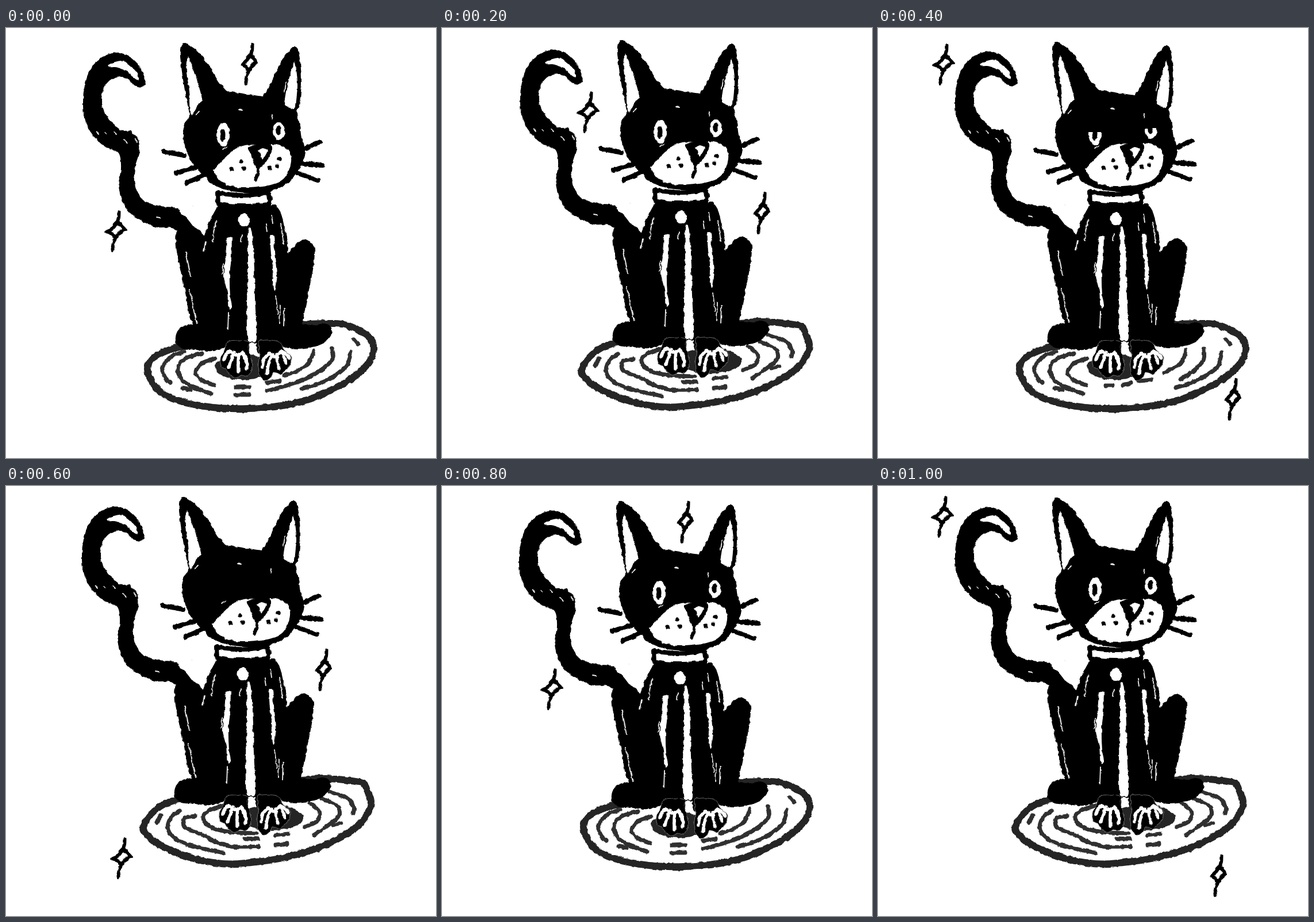
Write an HTML page that moves like this. It is 748 px wide and 748 px high and loops after 1.2 s.

```html
<!DOCTYPE html>
<html lang="en">
<head>
<meta charset="utf-8">
<title>Cat on a puddle</title>
<style>
  html, body { margin: 0; width: 100%; height: 100%; overflow: hidden; background: #fff; }
  svg { display: block; width: 100%; height: 100%; }
</style>
</head>
<body>
<svg id="stage" viewBox="0 0 748 748">
  <defs>
    <filter id="ink" filterUnits="userSpaceOnUse" x="-20" y="-20" width="800" height="800" color-interpolation-filters="sRGB">
      <feTurbulence type="fractalNoise" baseFrequency="0.11" numOctaves="2" seed="4" result="noise"/>
      <feDisplacementMap in="SourceGraphic" in2="noise" scale="5" xChannelSelector="R" yChannelSelector="G"/>
    </filter>
  </defs>
</svg>
<script>
const LOOP = 1200, STEP = 200;
const INK = "#000", WASH = "#252525", PAPER = "#fff";
const stage = document.getElementById("stage");

function add(parent, tag, attrs = {}) {
  const el = document.createElementNS("http://www.w3.org/2000/svg", tag);
  for (const key in attrs) el.setAttribute(key, attrs[key]);
  return parent.appendChild(el);
}

// Smooth curve through "x,y" points; a trailing * marks a sharp corner.
function curve(text, closed) {
  const pts = text.trim().split(/\s+/).map(s => {
    const [x, y] = s.split(",").map(parseFloat);
    return { x, y, sharp: s.endsWith("*") };
  });
  const n = pts.length;
  const at = i => closed ? pts[(i + n) % n] : pts[Math.max(0, Math.min(n - 1, i))];
  const slope = i => {
    if (at(i).sharp) return [0, 0];
    const a = at(i - 1), b = at(i + 1);
    return [(b.x - a.x) / 6, (b.y - a.y) / 6];
  };
  let d = `M${pts[0].x} ${pts[0].y}`;
  for (let i = 0; i < (closed ? n : n - 1); i++) {
    const p = at(i), q = at(i + 1), [ax, ay] = slope(i), [bx, by] = slope(i + 1);
    d += `C${p.x + ax} ${p.y + ay} ${q.x - bx} ${q.y - by} ${q.x} ${q.y}`;
  }
  return d + (closed ? "Z" : "");
}

const group = parent => add(parent, "g", { filter: "url(#ink)" });
const blob = (parent, pts, fill = INK, more = {}) =>
  add(parent, "path", { d: curve(pts, true), fill, ...more });
const line = (parent, pts, width, stroke = INK) =>
  add(parent, "path", {
    d: curve(pts, false), fill: "none", stroke,
    "stroke-width": width, "stroke-linecap": "round", "stroke-linejoin": "round"
  });
const lines = (parent, list, width, stroke) =>
  list.split("|").forEach(pts => line(parent, pts, width, stroke));
const oval = (parent, cx, cy, rx, ry, fill) => add(parent, "ellipse", { cx, cy, rx, ry, fill });

function puddle(rim, center, ripples) {
  const g = group(stage);
  blob(g, rim, PAPER, { stroke: WASH, "stroke-width": 12 });
  oval(g, ...center, WASH);
  lines(g, ripples, 7, "#303030");
  return g;
}

const rimA = `247,600 250,580 266,568 298,556 400,535 480,519 570,514 605,522 632,538 639,553
  635,575 612,602 575,625 530,645 480,657 420,662 360,660 300,648 265,630`;
const leftA = `310,563 285,573 272,592 277,608 286,617|
  341,566 312,575 299,592 306,612 328,626 357,636|
  364,575 341,583 330,600 343,614 362,621|605,541 612,550|307,627 321,629|`;
const wideA = puddle(rimA, [412, 590, 48, 22], leftA +
  `400,625 423,624|400,638 423,638|535,562 527,582 506,597 484,604|
  567,557 568,576 545,597 510,615 455,631|600,562 592,588 560,612 514,628|455,617 476,614`);
const calmA = puddle(rimA, [412, 590, 48, 22], leftA +
  `396,622 408,622|425,621 440,618|455,614 475,612|535,560 528,582 497,600|
  567,558 566,578 548,597 526,611|598,563 590,590 557,612 518,626`);
const puddleB = puddle(
  `244,592 262,567 300,548 400,530 480,517 560,511 625,518* 639,550 628,580 600,605
  550,630 490,648 430,657 380,659 320,647 270,625 246,605`,
  [465, 579, 56, 22],
  `273,575 267,587|306,567 290,580 286,600 302,618 335,630 382,640|
  334,576 314,580 316,596 344,608 372,622 402,630 443,629|
  385,557 356,567 347,580 362,596 395,604 440,606|
  418,615 443,616|472,610 495,607|473,626 494,624|
  532,553 549,568 545,585 524,595|552,545 578,557 584,574 566,591 540,609|
  567,534 597,545 609,560 608,572|573,592 587,588`);

const cat = group(stage);

// Tail
blob(cat, `243,97 238,78 228,62 210,47 190,43 165,52 147,72 137,100 134,130 137,160 150,185
  170,205 190,213 198,222 200,245 196,270 200,295 212,318 235,335 260,346 285,347 300,352
  330,356 318,335 305,322 296,313 270,310 245,303 230,288 223,265 225,240 232,215 230,195
  218,180 200,178 185,165 170,145 166,125 170,105 182,90 200,85 213,89 223,99 236,103`);
blob(cat, "180,63 200,57 213,64 227,78 231,90 222,87 213,77 203,71 190,68 181,68", PAPER);

// Body
blob(cat, `368,310* 355,335 345,361* 333,349 318,343 298,352 296,380 303,420 312,460 318,495
  325,515* 310,518 298,528 295,545 305,556 330,560 360,562 380,556 386,546* 386,565 420,565
  422,548* 436,548* 440,565 474,562 476,552 492,558 520,558 548,550 564,537 566,522 555,514
  535,517 515,515* 524,470 534,420 537,385 531,373 520,368 508,373 495,388 489,391*
  490,375 484,345 478,322 468,308*`);
blob(cat, "421,353 427,353 430,380 432,420 433,470 436,538 428,546 420,538 419,480 421,420", PAPER);
blob(cat, "384,365* 393,363* 392,400 389,430 390,465 393,486 387,487 385,460 379,432 382,400", PAPER);
blob(cat, "460,362 466,363 467,390 471,430 468,458 464,440 464,415 461,392", PAPER);
lines(cat, `313,390 321,432|319,455 325,486|326,488 332,514|387,494 386,524|469,465 473,498|
  477,482 476,514|484,488 483,518|478,340 483,376|462,326 464,340|452,342 454,354|
  347,372 344,388|366,334 360,360|361,362 360,372|378,410 377,428|410,360 409,372`, 1.8, "#eee");

// Collar and bell
blob(cat, "368,287* 385,289 415,291 457,287* 459,298 457,307* 420,310 385,309 369,306*",
  PAPER, { stroke: INK, "stroke-width": 8, "stroke-linejoin": "round" });
oval(cat, 414, 334, 10.5, 11, PAPER);

// Whiskers
lines(cat, `275,215 310,222|296,252 337,240|315,269 347,255|
  512,213 547,197|508,235 550,239|500,250 543,265`, 8);

// Head
blob(cat, `308,26* 319,30 336,43 355,68 371,94 384,110* 400,112 425,116 447,119* 459,100
  472,72 486,46 500,32* 507,36 512,60 514,95 511,130 506,148 512,170 515,192 521,211 518,228
  508,248 495,266 476,278 455,285 430,287 400,285 375,279 355,268 340,252 325,236 313,212
  308,185 312,165 319,152 314,125 308,90 304,60 303,38`);
blob(cat, "317,49* 325,70 335,100 342,125* 332,137 324,153* 321,146 319,110 314,75", PAPER);
blob(cat, "502,57* 492,90 486,124 485,135* 500,140 504,136* 507,100 505,72", PAPER);
blob(cat, `361,248* 375,232 395,213 412,205 428,203 448,202 470,203 488,210 496,226 493,245
  485,260 470,270 445,276 415,278 390,275 372,265`, PAPER);
blob(cat, "421,208 432,203 447,200 460,203 463,211 457,224 447,239 439,246 432,236 426,220");
blob(cat, "439,213* 447,209 456,212* 451,222 446,229*", PAPER);
line(cat, "439,243 438,253 434,265", 5);
for (const [x, y] of [[409, 232], [392, 245], [414, 244], [475, 228], [459, 243], [472, 240]])
  oval(cat, x, y, 3.8, 3.6, INK);
lines(cat, `487,95 485,110|331,150 336,145|404,142 411,143|376,212 384,207|462,158 463,152|
  172,182 174,184|188,181 193,186|207,194 211,201|225,192 228,199|158,180 161,185|
  325,310 326,311|262,329 268,330`, 1.8, "#eee");

// Eyes
const eyes = add(cat, "g");
oval(eyes, 378, 185.5, 11, 20.5, PAPER);
oval(eyes, 377, 186, 4.6, 11, INK);
oval(eyes, 474.5, 179, 10.5, 15, PAPER);
oval(eyes, 474, 179, 4.6, 8.5, INK);
const lids = add(eyes, "g");
add(lids, "rect", { x: 362, y: 160, width: 32, height: 23 });
add(lids, "rect", { x: 460, y: 160, width: 30, height: 17 });

// Paws
const paws = group(stage);
const halo = { stroke: "#888", "stroke-width": 0.8 };
blob(paws, `387,545 380,560 373,576 375,590 384,595 391,604 402,609 410,604 420,606 427,596
  427,578 421,560 420,545`, INK, halo);
blob(paws, `441,545 441,565 439,585 440,602 451,613 460,608 466,599 478,602 486,595 496,584
  495,570 484,560 473,545`, INK, halo);
lines(paws, `390,562 383,568 379,577|397,564 391,578 388,590|405,567 404,580 404,597|
  412,565 418,577 419,593|392,563 400,569 413,565`, 5.5, PAPER);
lines(paws, `458,566 449,576 446,590|464,568 457,584 454,601|471,567 472,580 475,593|
  478,564 485,574 486,584|481,563 490,569 492,574|457,566 468,571 480,563`, 5.5, PAPER);

// Sparkles: a pointed diamond around its own centre
function sparkle(w, tall) {
  const g = group(add(stage, "g"));
  g.setAttribute("transform", "translate(-300 -300)");
  const p = (x, y, c = "") => `${300 + x},${300 + y}${c}`;
  blob(g, [p(2, -15), p(w - 4, -2, "*"), p(3, 6), p(-2, 16, "*"), p(-4, 7), p(-w + 4, 1, "*"), p(-4, -5)].join(" "),
    PAPER, { stroke: INK, "stroke-width": 6, "stroke-linejoin": "round" });
  line(g, `${p(2, -13)} ${p(5, -24)} ${p(5.5, -tall)}`, 6);
  line(g, `${p(-2, 14)} ${p(-5, 25)} ${p(-5.5, tall)}`, 6);
  return g.parentNode;
}
const slim = sparkle(16, 34), broad = sparkle(20, 33);

const move = (el, [x, y]) => el.setAttribute("transform", `translate(${x} ${y})`);
const show = (el, on) => el.setAttribute("display", on ? "inline" : "none");

const first = { cat: [0, 0], paws: [0, 0], water: wideA, pool: [0, 0], eye: "open", slim: [423, 62], broad: [191, 353] };
const poses = [
  first,
  { cat: [2, -5], paws: [2, -5], water: puddleB, pool: [0, 0], eye: "open", slim: [556, 321], broad: [254, 146] },
  { cat: [0, -2], paws: [0, 0], water: calmA, pool: [0, 0], eye: "half", slim: [617, 645], broad: [114, 63] },
  { cat: [-2, -7], paws: [-2, -6], water: puddleB, pool: [-4, -2], eye: "shut", slim: [552, 319], broad: [201, 647] },
  first,
  { cat: [0, -6], paws: [0, -6], water: puddleB, pool: [-4, -2], eye: "open", slim: [592, 677], broad: [112, 53] }
];

function draw(pose) {
  move(cat, pose.cat);
  move(paws, pose.paws);
  for (const w of [wideA, calmA, puddleB]) show(w, w === pose.water);
  move(pose.water, pose.pool);
  show(eyes, pose.eye !== "shut");
  show(lids, pose.eye === "half");
  move(slim, pose.slim);
  move(broad, pose.broad);
}

const start = performance.now();
let current = -1;
function tick() {
  const step = Math.floor(((performance.now() - start) % LOOP) / STEP);
  if (step !== current) draw(poses[current = step]);
  requestAnimationFrame(tick);
}
tick();
</script>
</body>
</html>
```
